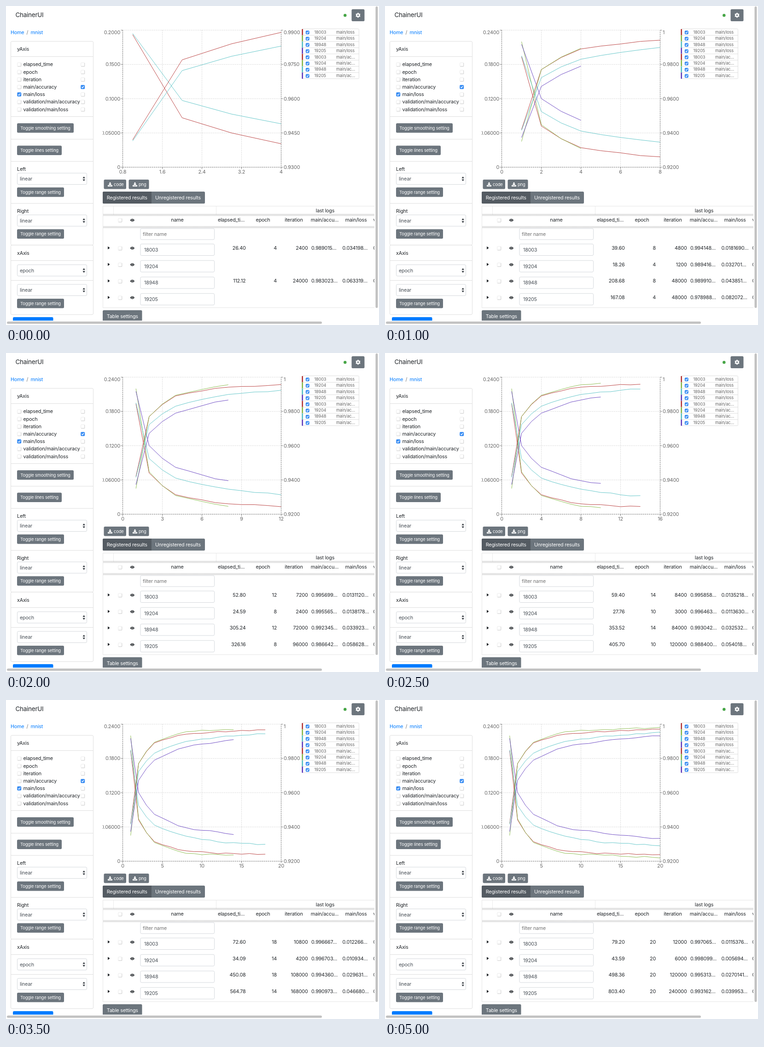
These frames come from a looping animation (810x691 px, 6 s). An HTML page:

```html
<!DOCTYPE html>
<html lang="en">
<head>
<meta charset="utf-8">
<title>ChainerUI</title>
<style>
html, body { margin: 0; width: 100%; height: 100%; overflow: hidden; background: #fff; }
svg { display: block; width: 810px; height: 691px; }
text { font: 10.8px Inter, "Open Sans", sans-serif; letter-spacing: -.02em; fill: #212529; white-space: pre; }
.title { font-size: 13.5px; }
.small { font-size: 9.45px; }
.legend { font-size: 9.2px; fill: #666; }
.tick { fill: #666; }
.white { fill: #fff; }
.link { fill: #007bff; }
.field { fill: #495057; }
.hint { fill: #757575; }
</style>
</head>
<body>
<svg viewBox="0 0 810 691">
  <defs>
    <clipPath id="page"><rect width="800" height="681.5"/></clipPath>
    <clipPath id="chartBox"><rect x="210" y="40" width="432" height="330"/></clipPath>
    <linearGradient id="shade" x2="0" y2="1">
      <stop offset="0" stop-color="#000" stop-opacity="0"/>
      <stop offset=".5" stop-color="#000" stop-opacity=".14"/>
      <stop offset="1" stop-color="#000" stop-opacity="0"/>
    </linearGradient>
  </defs>
  <g id="fixed" clip-path="url(#page)"></g>
  <g id="chart" clip-path="url(#chartBox)"></g>
  <g id="cells" clip-path="url(#page)"></g>
  <g fill="#c1c1c1">
    <rect x="802.5" y="1" width="5" height="653" rx="2.5"/>
    <rect x="2" y="683.5" width="684" height="5" rx="2.5"/>
  </g>
</svg>
<script>
const $ = id => document.getElementById(id);
const GREY = '#6c757d', LINE = '#dfdfdf', INPUT = '#d5d9dd';

// Each curve is given at these epochs; the rest is interpolated.
const keyEpochs = [1, 2, 4, 8, 12, 20];
const runs = [
  { name: 18003, color: '#b53333', lead: 4, iterations: 600, setup: 13.2, pace: 3.3,
    acc: [.942, .977, .989015, .994148, .995699, .997065],
    loss: [.1934, .0721, .034198, .018169, .013112, .0115376] },
  { name: 19204, color: '#85b745', lead: 0, iterations: 300, setup: 11.93, pace: 1.583,
    acc: [.935, .977, .989416, .995565, .9965, .998099],
    loss: [.2199, .0744, .032701, .0138178, .0118, .005694] },
  { name: 18948, color: '#55c1c4', lead: 4, iterations: 6000, setup: 15.56, pace: 24.14,
    acc: [.9415, .9723, .983023, .98991, .992345, .995313],
    loss: [.1951, .0974, .063319, .043851, .033923, .0270141] },
  { name: 19205, color: '#5f39be', lead: 0, iterations: 12000, setup: 8, pace: 39.77,
    acc: [.9373, .9672, .978988, .986642, .989527, .993162],
    loss: [.2151, .1201, .082072, .058628, .05134, .039953] }
];
const rowY = i => 524 + i * 35.75;

function noise(n, seed) {
  const v = Math.sin(n * 12.9898 + seed * 78.233) * 43758.5453;
  return (v - Math.floor(v)) * 2 - 1;
}

// Straight in log(epoch), with a slight wobble late in the training.
function valueAt(keys, n, wobble, seed) {
  const k = keyEpochs.findIndex(e => e >= n);
  if (keyEpochs[k] === n) return keys[k];
  const f = Math.log(n / keyEpochs[k - 1]) / Math.log(keyEpochs[k] / keyEpochs[k - 1]);
  const v = keys[k - 1] + (keys[k] - keys[k - 1]) * f;
  return n > 4 ? v + wobble * noise(n, seed) : v;
}
const accAt = (i, n) => valueAt(runs[i].acc, n, -.0004, i);
const lossAt = (i, n) => valueAt(runs[i].loss, n, .0014, i);

// y is the middle of the text line
const text = (s, x, y, cls = '', anchor = 'start') =>
  `<text x="${x}" y="${y}" dy=".36em" class="${cls}" text-anchor="${anchor}">${s}</text>`;
const rect = (x, y, w, h, fill, r = 0, stroke = 'none') =>
  `<rect x="${x}" y="${y}" width="${w}" height="${h}" rx="${r}" fill="${fill}" stroke="${stroke}"/>`;
const path = (d, stroke, extra = '') => `<path d="${d}" fill="none" stroke="${stroke}" ${extra}/>`;
const button = (s, x, y, w, h = 20.5, cls = 'small') =>
  rect(x, y, w, h, GREY, 2.5) + text(s, x + w / 2, y + h / 2, 'white ' + cls, 'middle');
const input = (s, x, y, w, h, pad, cls = 'field') =>
  rect(x + .5, y + .5, w - 1, h - 1, '#fff', 2.5, INPUT) + text(s, x + pad, y + h / 2, cls);
const select = (s, y) => input(s, 24, y, 152, 25.5, 6) +
  `<path d="M166.500 ${y + 11.7}h5.400l-2.700 -4zM166.500 ${y + 14}h5.400l-2.700 4z" fill="#343a40"/>`;

function checkbox(x, y, on, size = 9) {
  const l = x - size / 2, t = y - size / 2;
  if (!on) return rect(l + .5, t + .5, size - 1, size - 1, '#fff', 1.5, '#ebebeb') +
    path(`M${l + 1} ${t + size - .5}h${size - 1.5}v${1.5 - size}`, '#c8c8c8', 'stroke-width=".8"');
  return rect(l, t, size, size, '#3b8ef3', 2) +
    path(`M${x - size * .25} ${y}l${size * .19} ${size * .22}l${size * .33} ${-size * .45}`, '#fff', 'stroke-width="1.3"');
}

const eye = y => `<path d="M269.500 ${y}q4.800 -6.600 9.600 0q-4.800 6.600 -9.600 0z" fill="#212529"/>` +
  `<circle cx="274.300" cy="${y}" r="1.900" fill="#212529" stroke="#fff" stroke-width=".8"/>`;

const download = (x, y) =>
  `<path d="M${x - 1.3} ${y - 4.5}h2.600v3.500h2.400l-3.700 3.700l-3.700 -3.700h2.400z" fill="#fff"/>` +
  `<path d="M${x - 5} ${y + 1.5}h2.500l2.500 2l2.500 -2h2.500v3h-10z" fill="#fff"/>`;

function gear(x, y) {
  let s = `<circle cx="${x}" cy="${y}" r="2.900" fill="none" stroke="#fff" stroke-width="2.400"/>`;
  for (let a = 0; a < 360; a += 60)
    s += `<rect x="${x - 1.2}" y="${y - 5.3}" width="2.400" height="2.400" fill="#fff" transform="rotate(${a} ${x} ${y})"/>`;
  return s;
}

function header() {
  return text('ChainerUI', 20.5, 19.3, 'title') +
    '<circle cx="736.300" cy="20.300" r="3.200" fill="#46a546"/>' +
    rect(750.5, 7, 28, 26, GREY, 2.5) + gear(764.5, 20) +
    text('Home', 10, 57.5, 'link') + text('/', 44.5, 57.5, 'hint') + text('mnist', 53.5, 57.5, 'link');
}

function sidebar() {
  const keys = ['elapsed_time', 'epoch', 'iteration', 'main/accuracy', 'main/loss',
    'validation/main/accuracy', 'validation/main/loss'];
  let s = rect(10.5, 76.5, 179, 441.5, '#fff', 2.5, LINE) + rect(10.5, 518, 179, 150.5, '#fff', 2.5, LINE);
  for (const y of [109.5, 239.5, 288.5, 336.5, 427.5, 551.5, 594.5]) s += path(`M10.500 ${y}h179`, LINE);
  s += text('yAxis', 24, 93.5) + text('xAxis', 24, 535.5);
  keys.forEach((k, i) => {
    const y = 126.5 + i * 16.2;
    s += checkbox(28.7, y + .3, i === 4) + text(k, 37.5, y) + checkbox(166.7, y + .3, i === 3);
  });
  s += button('Toggle smoothing setting', 24, 254, 123) + button('Toggle lines setting', 24, 302.5, 97);
  s += text('Left', 24, 353.5) + select('linear', 361.5) + button('Toggle range setting', 24, 393, 102);
  s += text('Right', 24, 444) + select('linear', 452) + button('Toggle range setting', 24, 483.5, 102);
  s += select('epoch', 560) + select('linear', 602.5) + button('Toggle range setting', 24, 634, 102);
  return s + rect(15, 674, 87.5, 20, '#007bff', 2.5);
}

function legend() {
  let s = rect(642.5, 49.5, 124, 108, '#fff', 2, LINE);
  for (let i = 0; i < 8; i++) {
    const y = 50 + i * 13.45, run = runs[i % 4];
    if (i) s += path(`M643 ${y}h123`, LINE);
    s += rect(642.5, y, 2.5, 13.45, run.color) + checkbox(654.8, y + 7.3, true, 8) +
      text(run.name, 669.5, y + 6.4, 'legend') +
      text(i < 4 ? 'main/loss' : 'main/ac…', 717, y + 6.4, 'legend');
  }
  return s;
}

function table() {
  let s = rect(212.5, 376, 48.5, 20.5, GREY, 2.5) + download(226, 386.5) + text('code', 234, 386.5, 'white small') +
    rect(266.5, 376, 44, 20.5, GREY, 2.5) + download(280, 386.5) + text('png', 288, 386.5, 'white small');
  s += rect(210, 402, 222, 26, GREY, 2.5) + rect(210, 402, 106, 26, '#545b62', 2.5) + rect(312, 402, 4, 26, '#545b62');
  s += text('Registered results', 262.7, 415, 'white', 'middle') + text('Unregistered results', 373.5, 415, 'white', 'middle');
  s += rect(210.5, 433.5, 620, 220, '#fff', 0, '#e6e6e6') + path('M233.500 434v18M456.500 434v18', '#ececec');
  s += rect(211, 449, 600, 7, 'url(#shade)') + rect(211, 475.5, 600, 7, 'url(#shade)');
  s += text('last logs', 693, 443.5, '', 'middle') + checkbox(247.7, 464) + eye(464);
  for (const [label, x] of [['name', 372], ['elapsed_ti…', 489], ['epoch', 558], ['iteration', 625],
    ['main/accu…', 692], ['main/loss', 760]]) s += text(label, x, 463, '', 'middle');
  s += text('v', 797.5, 463) + input('filter name', 291.5, 481.5, 161.5, 25, 5.5, 'hint');
  runs.forEach((run, i) => {
    const y = rowY(i);
    s += `<path d="M221 ${y - 3.2}l4.600 3.200l-4.600 3.200z" fill="#212529"/>` +
      checkbox(247.7, y + .8) + eye(y + .5) + input(run.name, 291.5, y - 9, 161.5, 26, 8.5);
  });
  return s + button('Table settings', 210, 659, 85.5, 26, '');
}

const left = 253.5, right = 597.5, top0 = 52.3, bottom = 349.2;
const tickText = v => {
  v = +v.toFixed(4);
  return v % 1 ? v.toPrecision(4) : String(v);
};

function drawChart(step, epochs) {
  const first = step === 0, last = Math.ceil(epochs[0] / 4) * 4;
  const xs = first ? [.8, 4] : [0, last];
  const lossMax = first ? .2 : .24;
  const accRange = first ? [.93, .99] : [.92, 1];
  const px = v => left + (v - xs[0]) / (xs[1] - xs[0]) * (right - left);
  const py = (v, [lo, hi]) => bottom - (v - lo) / (hi - lo) * (bottom - top0);
  const at = ([lo, hi], f) => lo + (hi - lo) * f;
  let grid = '', marks = '', labels = '';
  for (let i = 0; i < 5; i++) {
    const f = i / 4, x = at([left, right], f), y = at([bottom, top0], f), ty = i === 4 ? y + 4.7 : y;
    grid += `M${left} ${y}H${right}M${x} ${top0}V${bottom}`;
    marks += `M${left - 4} ${y}h4M${right} ${y}h4M${x} ${bottom}v4`;
    labels += text(tickText(lossMax * f), 248, ty, 'tick', 'end') +
      text(tickText(at(accRange, f)), 603, ty, 'tick') +
      text(+at(xs, f).toFixed(1), x, 358.8, 'tick', 'middle');
  }
  const plot = (valueOf, range) => runs.map((run, i) => {
    const pts = Array.from({ length: epochs[i] }, (_, e) =>
      px(e + 1).toFixed(2) + ' ' + py(valueOf(i, e + 1), range).toFixed(2));
    return pts.length ? path('M' + pts.join('L'), run.color, 'stroke-width=".9"') : '';
  }).join('');
  $('chart').innerHTML = path(grid, '#ccc', 'stroke-dasharray="2 2" stroke-width=".9"') +
    path(`M${left} ${top0}V${bottom}H${right}V${top0}`, '#666', 'stroke-dasharray="3 1.5" stroke-width=".8"') +
    path(marks, '#666', 'stroke-width=".8"') + labels + plot(lossAt, [0, lossMax]) + plot(accAt, accRange);
}

// Narrow digits leave room for one more before the ellipsis.
function clipNumber(v) {
  const s = v.toFixed(7);
  const room = s.split('1').length - 1 + (s.split('7').length - 1) / 2;
  return (room >= 2 ? s : s.slice(0, 8)) + '…';
}

function drawCells(epochs) {
  $('cells').innerHTML = epochs.map((n, i) => {
    if (!n) return '';
    const y = rowY(i), { setup, pace, iterations } = runs[i];
    return text((setup + pace * n).toFixed(2), 520.5, y, '', 'end') + text(n, 588, y, '', 'end') +
      text(n * iterations, 655.5, y, '', 'end') + text(clipNumber(accAt(i, n)), 663, y) +
      text(clipNumber(lossAt(i, n)), 730.5, y) + text('0', 797.5, y);
  }).join('');
}

let shown = -1;
function render(ms) {
  const step = Math.min(10, Math.floor(ms % 6000 / 500));
  if (step === shown) return;
  shown = step;
  const epochs = runs.map(run => Math.min(20, run.lead + step * 2));
  drawChart(step, epochs);
  drawCells(epochs);
}

$('fixed').innerHTML = header() + sidebar() + legend() + table();
const start = performance.now();
function loop() {
  render(performance.now() - start);
  requestAnimationFrame(loop);
}
loop();
</script>
</body>
</html>
```
